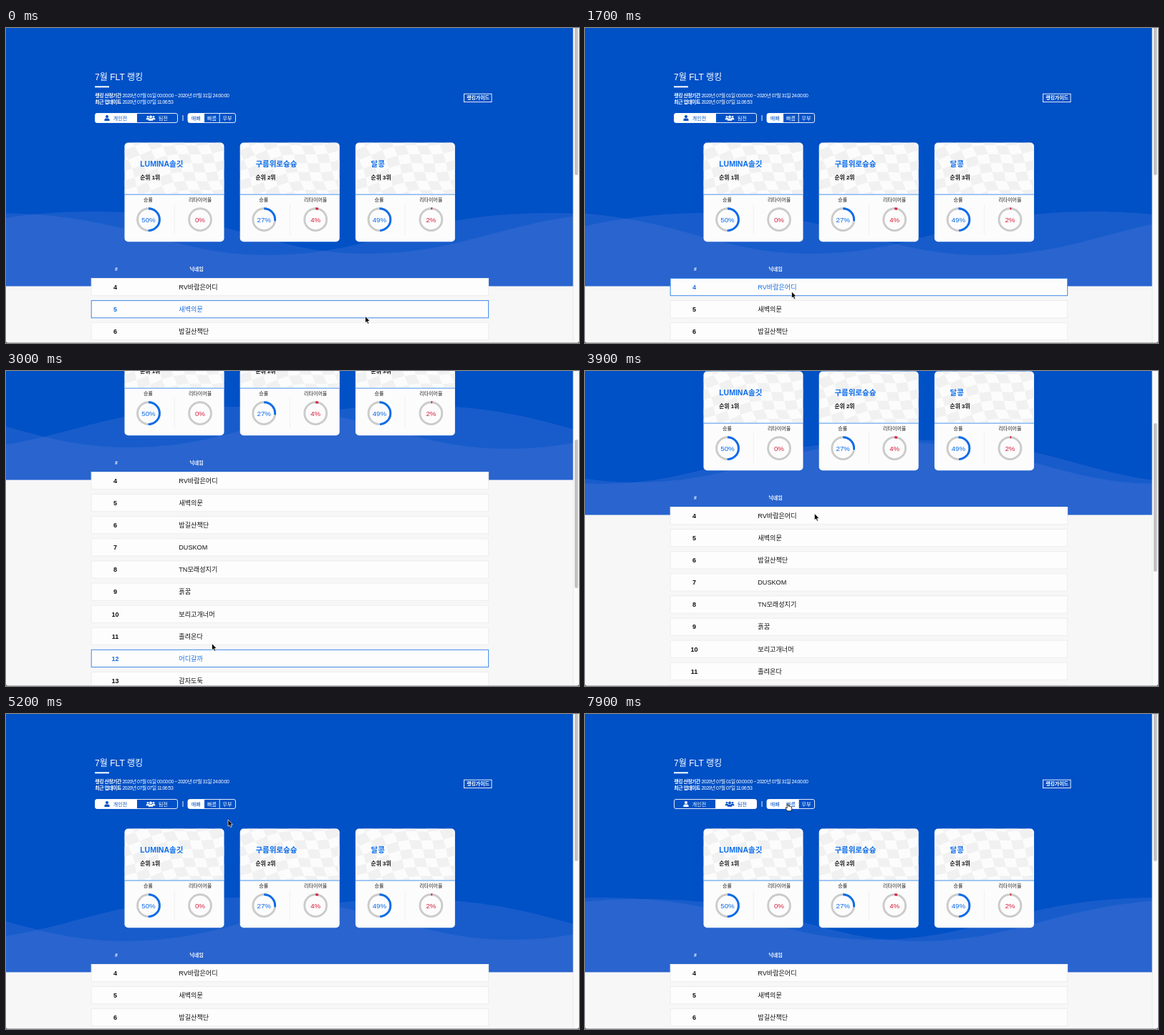
An HTML page for the animation above (8000 ms loop, 800x441 px).

```html
<!DOCTYPE html>
<html lang="ko">
<head>
<meta charset="utf-8">
<title>랭킹</title>
<style>
html, body { margin: 0; width: 100%; height: 100%; overflow: hidden; background: #f7f7f7; }
svg { display: block; width: 800px; height: 441px; }
text { font-family: "Liberation Sans", "Noto Sans CJK KR", "Noto Sans CJK", sans-serif; white-space: pre; }
.b { font-weight: 700; }
.m { text-anchor: middle; }
.tab rect { fill: transparent; }
.tab { fill: #fff; }
.tab.on { fill: #0050c6; }
.tab.on rect { fill: #fff; }
.row rect { fill: #fdfdfd; stroke: #ededed; }
.row.on rect { stroke: #3d8bea; }
.row.on text { fill: #1a6fe0; }
</style>
</head>
<body>
<svg id="stage" viewBox="0 0 800 441">
  <defs>
    <clipPath id="flagClip"><path d="M0 72V5a5 5 0 0 1 5-5H134a5 5 0 0 1 5 5V72z"/></clipPath>
    <clipPath id="tabsA"><rect x="124.5" y="119.5" width="115" height="13" rx="2.5"/></clipPath>
    <clipPath id="tabsB"><rect x="254" y="119.5" width="66.5" height="13" rx="2.5"/></clipPath>
  </defs>
  <g id="page"></g>
  <g id="bar">
    <rect x="792" width="8" height="441" fill="#fafafa"/>
    <rect x="791.6" width=".8" height="441" fill="#e6e6e6"/>
    <rect id="thumb" x="794" y="-2" width="4.6" height="208" rx="2.3" fill="#c1c1c1"/>
  </g>
  <path d="M0 438v3h3q-3 0-3-3zM800 438v3h-3q3 0 3-3z" fill="#222"/>
  <rect y="440.5" width="800" height=".5" fill="#777"/>
  <path id="arrow" d="M0 0V9.3L2.1 7.4 3.6 10.7 5.2 10 3.8 6.8H6.6z" fill="#000" stroke="#fff" stroke-width=".7"/>
  <path id="hand" d="M-.9.7Q0-.5.9.7V3.4Q2-.1 2.7 3.7 3.8 2.7 4.3 4.1 5.6 3.4 5.7 5V7L4.6 9.8H-.4L-2.9 6.2Q-3.4 4.6-2.2 4.8L-.9 6z" fill="#fff" stroke="#111" stroke-width=".8"/>
</svg>
<script>
const LOOP = 8000, STEP = 100;
const PERIOD = 779, CREST = 395, SCALE = .487;
const BLUE = '#0050c6', LINK = '#0b6cec', RED = '#d8203f';
const $ = id => document.getElementById(id);

const text = (x, y, size, str, fill = '#fff', cls = '', more = '') =>
  `<text x="${x}" y="${y + size * .36}" font-size="${size}" fill="${fill}" class="${cls}" ${more}>${str}</text>`;
const tabText = (x, str) => `<text x="${x}" y="128.5" font-size="7" class="m">${str}</text>`;
const rect = (x, y, w, h, fill) => `<rect x="${x}" y="${y}" width="${w}" height="${h}" fill="${fill}"/>`;

const person = (x, y, s) => `<g transform="translate(${x} ${y}) scale(${s})">
  <circle cy="-2" r="2.1"/><path d="M-3.6 4V2.8Q-3.6.6-1.6.6H1.6Q3.6.6 3.6 2.8V4z"/></g>`;

function wave(id) {
  const hump = 'c311 0 410-121 811-121 400 0 500 121 789 121';
  return `<path id="${id}" d="M0 121${hump.repeat(3)}V240H0z" fill="#5078d7" fill-opacity=".3"/>`;
}

// Waving checkered flag: a grid bent by sines
function flag() {
  const at = (u, v) => [
    u * 16 + v * 5 - 34 + 3 * Math.sin(v * .9),
    v * 12.5 - u * 3.2 + 14 + 5 * Math.sin(u * .8 + .6)
  ].map(n => n.toFixed(1)).join(' ');
  let d = '';
  for (let u = -2; u < 12; u++)
    for (let v = -3; v < 9; v++)
      if ((u + v) % 2 === 0)
        d += `M${at(u, v)}L${at(u + 1, v)} ${at(u + 1, v + 1)} ${at(u, v + 1)}z`;
  return `<path d="${d}" fill="#f1f1f1" clip-path="url(#flagClip)"/>`;
}

function ring(x, pct, color) {
  const r = 15.4, c = 2 * Math.PI * r;
  const circle = more => `<circle cx="${x}" cy="107.7" r="${r}" fill="none" stroke-width="2.9" ${more}/>`;
  return circle('stroke="#cbcbcb"') +
    (pct ? circle(`stroke="${color}" stroke-dasharray="${c * pct / 100} ${c}" transform="rotate(-90 ${x} 107.7)"`) : '') +
    text(x, 107.7, 9.7, pct + '%', color, 'm');
}

function card([name, win, retire], i) {
  return `<g transform="translate(${165.5 + i * 161.2} 160.5)">
    <rect width="139" height="138.7" rx="5" fill="#fcfcfc"/>${flag()}
    ${rect(0, 72.1, 139, 1, '#4a94ee')}${rect(69.3, 86, .7, 43, '#ececec')}
    ${text(21.7, 30, 10.5, name, LINK, 'b')}
    ${text(21.7, 48.5, 7.8, `순위 ${i + 1}위`, '#111', 'b')}
    ${text(33, 80.2, 7, '승률', '#222', 'm')}${text(105.5, 80.2, 7, '리타이어율', '#222', 'm')}
    ${ring(33.5, win, LINK)}${ring(105.5, retire, RED)}</g>`;
}

function row(name, i) {
  const y = 362.7 + i * 31.1;
  return `<g class="row" id="row${i + 4}">
    <rect x="119.2" y="${y - 12.2}" width="554.4" height="24.2"/>
    ${text(152.5, y, 9.1, i + 4, '#111', 'b m')}${text(241.3, y, 9.1, name, '#111')}</g>`;
}

const cards = [['LUMINA솔깃', 50, 0], ['구름위로슝슝', 27, 4], ['달콩', 49, 2]];
const names = ['RV바람은어디', '새벽의문', '밤길산책단', 'DUSKOM', 'TN모래성지기',
  '흙꿈', '보리고개너머', '졸려온다', '어디갈까', '감자도둑'];

const tight = 'letter-spacing="-.5"';
$('page').innerHTML =
  rect(0, 0, 792, 362, BLUE) + wave('waveA') + wave('waveB') +
  rect(0, 361.5, 792, 600, '#f7f7f7') +
  text(124, 69, 12.1, '7월 FLT 랭킹') + rect(124, 81.3, 20, 2, '#fff') +
  text(124.3, 94.6, 6.9, '랭킹 산정기간', '#fff', 'b', tight) +
  text(162.5, 94.6, 6.9, '2020년 07월 01일 00:00:00 ~ 2020년 07월 31일 24:00:00', '#fff', '', tight) +
  text(124.3, 103.3, 6.9, '최근 업데이트', '#fff', 'b', tight) +
  text(162.5, 103.3, 6.9, '2020년 07월 07일 11:06:53', '#fff', '', tight) +
  '<rect x="639.5" y="92.2" width="38.5" height="11.4" fill="none" stroke="#fff" stroke-width=".9"/>' +
  text(659, 98, 6.9, '랭킹가이드', '#fff', 'b m') +
  `<g clip-path="url(#tabsA)">
    <g class="tab" id="solo"><rect x="124" y="119" width="58.5" height="14"/>${person(141, 126, 1)}${tabText(159.5, '개인전')}</g>
    <g class="tab" id="team"><rect x="182.5" y="119" width="58" height="14"/>${person(198, 125.6, .65)}${person(206, 125.6, .65)}${person(202, 126.2, .9)}${tabText(219.5, '팀전')}</g>
  </g>
  <g clip-path="url(#tabsB)">
    <g class="tab on"><rect x="254" y="119" width="22.6" height="14"/>${tabText(265.3, '매빠')}</g>
    <g class="tab" id="fast"><rect x="276.6" y="119" width="21.6" height="14"/>${tabText(287.5, '빠름')}</g>
    <g class="tab"><rect x="298.2" y="119" width="23" height="14"/>${tabText(309, '무부')}</g>
  </g>
  <g fill="none" stroke="#fff" stroke-width=".9">
    <rect x="124.5" y="119.5" width="115" height="13" rx="2.5"/>
    <rect x="254" y="119.5" width="66.5" height="13" rx="2.5"/>
    <path d="M182.5 119.5v13M276.6 119.5v13M298.2 119.5v13M247 122v8"/>
  </g>` +
  cards.map(card).join('') +
  text(154, 337.3, 7, '#', '#fff', 'b m') + text(266, 337.3, 7, '닉네임', '#fff', 'b m') +
  names.map(row).join('');

// Steps: time, then values
const scrollSteps = [[1900, 0], [2400, 100], [2800, 192], [3000, 209], [3500, 209], [3900, 160], [4300, 75], [4800, 0]];
const mouseSteps = [[0, 501.5, 403.5], [300, 495, 402], [1000, 350, 384], [1500, 288.5, 369], [1700, 288.5, 369],
  [1900, 287.5, 394], [2800, 287.5, 394], [3000, 287.5, 381.5], [3400, 292, 372], [4000, 326, 165], [4300, 328.5, 150],
  [5200, 310, 148], [6200, 236, 134], [6700, 230, 132], [7000, 222, 127], [7300, 228, 127], [7900, 283, 126]];
const hoverSteps = [[0, 5], [1100, 4], [1800, 5], [2500, 8], [2700, 12], [3100, 11], [3600, 0]];

function between(steps, t) {
  const i = steps.findIndex(s => s[0] > t);
  if (i < 0) return steps[steps.length - 1].slice(1);
  if (i === 0) return steps[0].slice(1);
  const a = steps[i - 1], b = steps[i], k = (t - a[0]) / (b[0] - a[0]);
  return a.slice(1).map((v, n) => v + (b[n + 1] - v) * k);
}
const latest = (steps, t) => steps.filter(s => s[0] <= t).pop()[1];
const place = (id, x, y, s = 1) => $(id).setAttribute('transform', `translate(${x} ${y}) scale(${s})`);
const toggle = (id, on) => $(id).classList.toggle('on', on);

function placeWave(id, crest, y) {
  const x = ((crest % PERIOD) + PERIOD) % PERIOD;
  place(id, x - CREST - PERIOD, y, SCALE);
}

function draw(t) {
  const [scroll] = between(scrollSteps, t);
  const [x, y] = between(mouseSteps, t);
  const drift = PERIOD * t / 7000;
  const hover = latest(hoverSteps, t);
  const onButton = t >= 6200;

  place('page', 0, -scroll);
  place('thumb', 0, scroll * .469);
  placeWave('waveA', 120 - drift, 257);
  placeWave('waveB', -19 + drift, 259);

  names.forEach((_, i) => toggle('row' + (i + 4), i + 4 === hover));
  toggle('solo', t < 7100);
  toggle('team', t >= 7100);
  toggle('fast', t >= 7800);

  place('arrow', x, y);
  place('hand', x, y);
  $('arrow').style.display = onButton ? 'none' : '';
  $('hand').style.display = onButton ? '' : 'none';
}

const start = performance.now();
function tick() {
  const t = (performance.now() - start) % LOOP;
  draw(Math.floor(t / STEP) * STEP);
  requestAnimationFrame(tick);
}
tick();
</script>
</body>
</html>
```
